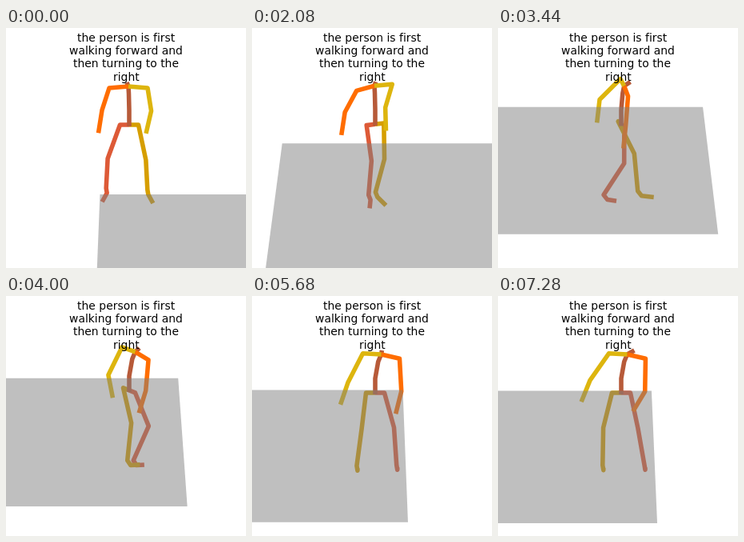
Animation, 300 px wide and 300 px high, one loop 7360 ms. Source, as an HTML page with a canvas:

```html
<!DOCTYPE html>
<html lang="en">
<head>
<meta charset="utf-8">
<title>Walking figure</title>
<style>
  html, body { margin: 0; width: 100%; height: 100%; overflow: hidden; background: #fff; }
  canvas { display: block; }
</style>
</head>
<body>
<canvas id="stage" width="300" height="300"></canvas>
<script>
const ctx = document.getElementById('stage').getContext('2d');
const LOOP = 7360, STEP = 80, RAD = Math.PI / 180;
const CAPTION = ['the person is first', 'walking forward and', 'then turning to the', 'right'];

// Screen angles of each bone in degrees from straight down, at these times.
const TIMES = [0, 1200, 2800, 4000, 5040, 6400, 7280];
const RIGHT = {
  side: -1, leg: '#dd5a37', arm: '#ff6d00',
  thigh: [-20, -4, 23, 22, 15, 16, 12],
  shin: [-3, -11, 6, -24, 3, 5, 10],
  upperArm: [-18, -26, -34, -5, 5, 1, -1],
  forearm: [-9, 4, -22, -17, -30, 5, -31]
};
const LEFT = {
  side: 1, leg: '#d69e00', arm: '#ddb50e',
  thigh: [12, 3, -7, 13, -5, -9, -14],
  shin: [3, -2, -31, -6, -9, -6, -1],
  upperArm: [9, 18, -38, -26, -28, -26, -35],
  forearm: [-13, 6, 2, 11, -22, -15, -22]
};

const smooth = p => p * p * (3 - 2 * p);
const ease = (t, from, to) => smooth(Math.min(Math.max((t - from) / (to - from), 0), 1));

function keyed(values, t) {
  return TIMES.slice(1).reduce(
    (sum, end, i) => sum + (values[i + 1] - values[i]) * ease(t, TIMES[i], end), values[0]);
}

function bone([x, y], length, degrees) {
  return [x + length * Math.sin(degrees * RAD), y + length * Math.cos(degrees * RAD)];
}

// Everything the joints share at one moment.
function bodyState(t) {
  const turn = ease(t, 1200, 5040);
  const inWalk = Math.min(Math.max((t - 1200) / 3840, 0), 1);
  const walk = Math.sin(Math.PI * inWalk) ** 2;
  const phase = 2 * Math.PI * (t - 2800) / 2400;
  const bob = walk * Math.cos(phase);
  const shoulderYaw = 163 * turn * RAD;
  const pelvis = [154, 121 + 5.5 * bob];
  return {
    t, turn, pelvis, shoulderYaw,
    hipYaw: (180 * turn + 30 * bob) * RAD,
    swing: 25 * walk * Math.sin(phase) ** 2 * Math.sin(shoulderYaw),
    neck: [153 + 8.5 * ease(t, 2800, 4000), pelvis[1] - 48]
  };
}

function leg({ side, thigh, shin }, s) {
  const cos = Math.cos(s.hipYaw), sin = Math.sin(s.hipYaw);
  const hip = [s.pelvis[0] + side * 11.5 * cos, s.pelvis[1] - side * 4 * sin];
  const knee = bone(hip, 45, keyed(thigh, s.t) + side * s.swing);
  const ankle = bone(knee, 37 + 10 * ease(s.t, 1200, 2800), keyed(shin, s.t) + side * s.swing);
  const heel = [ankle[0] + 1 + 4 * sin, ankle[1] + 6];
  const toe = [heel[0] + 14 * sin + side * 3 * (1 + cos), heel[1] + 4 + 7 * cos];
  return [s.pelvis, hip, knee, ankle, heel, toe];
}

function arm({ side, upperArm, forearm }, s) {
  const cos = Math.cos(s.shoulderYaw), sin = Math.sin(s.shoulderYaw);
  const shoulder = [s.neck[0] + side * 24 * cos, s.neck[1] + 2 - side * 11 * sin];
  const elbow = bone(shoulder, 29 + 12 * s.turn, keyed(upperArm, s.t) - side * s.swing * 0.6);
  return [s.neck, shoulder, elbow, bone(elbow, 29, keyed(forearm, s.t) - side * s.swing * 0.6)];
}

function spine({ t, pelvis: [x, y], neck, shoulderYaw }) {
  const look = 10 * Math.sin(shoulderYaw) - 2 + 8 * ease(t, 6400, 7280);
  return [[x, y + 2], [x, y - 18], [(x + neck[0]) / 2, y - 39], neck, [neck[0] + look, neck[1] - 5]];
}

function drawChain(points, color) {
  ctx.strokeStyle = color;
  ctx.beginPath();
  points.forEach(p => ctx.lineTo(...p));
  ctx.stroke();
}

function drawBody(t) {
  const s = bodyState(t);
  ctx.lineWidth = 5.56;
  ctx.lineJoin = 'round';
  drawChain(leg(RIGHT, s), RIGHT.leg);
  drawChain(leg(LEFT, s), LEFT.leg);
  drawChain(spine(s), '#b75a39');
  drawChain(arm(RIGHT, s), RIGHT.arm);
  drawChain(arm(LEFT, s), LEFT.arm);
}

// The floor slides past as the walker moves; its sides meet at a vanishing point.
function drawFloor(t) {
  const left = -0.0396 - 0.01 * ease(t, 0, 1200) - 0.3124 * ease(t, 665, 4850)
    + 0.005 * ease(t, 5000, 7280);
  const right = left + 0.4;
  const top = 208 - 110.5 * ease(t, 950, 3000) + 21 * ease(t, 3000, 6100);
  const bottom = top + 159.5 + (top - 100) * 0.33;
  const corner = (slope, y) => ctx.lineTo(155 + slope * (y + 740), y);
  ctx.fillStyle = 'rgba(128, 128, 128, 0.5)';
  ctx.beginPath();
  corner(left, top);
  corner(right, top);
  corner(right, bottom);
  corner(left, bottom);
  ctx.fill();
}

function drawCaption() {
  ctx.fillStyle = '#000';
  ctx.font = '13.89px "DejaVu Sans", sans-serif';
  ctx.letterSpacing = '0.03px'; // also keeps "fi" as two letters
  CAPTION.forEach((line, i) => {
    const x = Math.round(150 - ctx.measureText(line).width / 2);
    ctx.fillText(line, x, 17 + Math.round(16.2 * i));
  });
}

function draw() {
  const t = Math.floor(performance.now() % LOOP / STEP) * STEP;
  ctx.fillStyle = '#fff';
  ctx.fillRect(0, 0, 300, 300);
  drawBody(t);
  drawFloor(t);
  drawCaption();
  requestAnimationFrame(draw);
}
draw();
</script>
</body>
</html>
```
